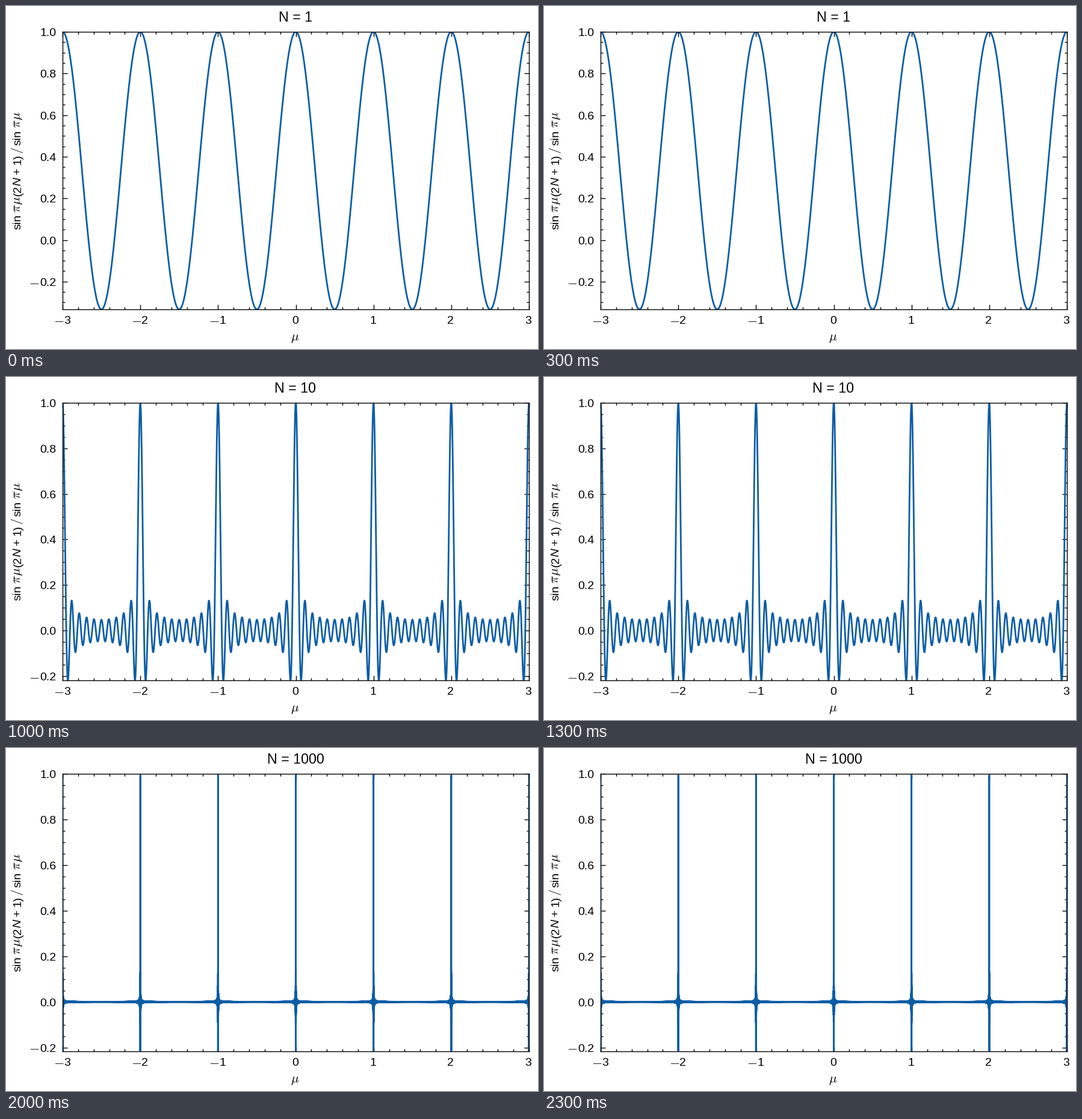
A matplotlib script that plays this animation: 884 px wide and 571 px high, repeating every 2500 ms.

```python
import numpy as np
import matplotlib.pyplot as plt
from matplotlib.animation import FuncAnimation
from matplotlib.ticker import MultipleLocator

W, H, DPI = 884, 571, 200
LEFT, RIGHT, TOP, BOTTOM = 94, 869, 43, 505  # axes edges in pixels from the top left
ORDERS = [1, 5, 10, 100, 1000]
Y_TICKS = np.arange(-1, 6) / 5

plt.rcParams.update({
    "font.family": "Liberation Sans",
    "font.size": 7,
    "axes.linewidth": 0.5,
    "path.simplify": False,
})

fig = plt.figure(figsize=(W / DPI, H / DPI), dpi=DPI, facecolor="white")
ax = fig.add_axes([LEFT / W, 1 - BOTTOM / H, (RIGHT - LEFT) / W, (BOTTOM - TOP) / H])


def put(x, y, text, **style):
    """Place text by its baseline, in pixels from the top left."""
    return fig.text(x / W, 1 - y / H, text, va="baseline", **style)


def put_math(x, y, text, size, **style):
    return put(x, y, text, size=size, math_fontfamily="cm", **style)


def kernel(x, n):
    """Normalised Dirichlet kernel; its limit at whole x is 1."""
    m = 2 * n + 1
    low = np.sin(np.pi * x)
    peak = np.abs(low) < 1e-9
    return np.where(peak, 1, np.sin(m * np.pi * x) / (m * np.where(peak, 1, low)))


mu = np.linspace(-3, 3, 100_000)
curves = [kernel(mu, n) for n in ORDERS]
line, = ax.plot(mu, curves[0], color="#0C5DA5", lw=1)

ax.set_xlim(-3, 3)
ax.xaxis.set_major_locator(MultipleLocator(1))
ax.xaxis.set_minor_locator(MultipleLocator(0.2))
ax.yaxis.set_major_locator(MultipleLocator(0.2))
ax.yaxis.set_minor_locator(MultipleLocator(0.05))
ax.tick_params(which="both", direction="in", width=0.5, top=True, right=True,
               labelbottom=False, labelleft=False)
ax.tick_params(which="major", length=3)
ax.tick_params(which="minor", length=1.5)

title = put(481, 26.4, "", size=8.4, ha="center")

# Horizontal axis labels
for k in range(-3, 4):
    x = LEFT - 1 + (k + 3) * (RIGHT - LEFT) / 6
    if k < 0:
        put_math(x - 14.1, 529, "$-$", 8)
        put(x + 3.2, 529, str(-k))
    else:
        put(x, 529, str(k), ha="center")
put_math(480.2, 556.8, r"$\mu$", 7.7, ha="center")

# Vertical axis label, read upwards
LABEL_X = 24.4
upward = dict(rotation=90, rotation_mode="anchor", ha="left")
for y, text, slant in [(372.5, "sin", "normal"), (316.5, "(2", "normal"),
                       (299.2, "N", "italic"), (280.1, "+", "normal"),
                       (263.7, "1)", "normal"), (231.5, "sin", "normal")]:
    put(LABEL_X, y, text, style=slant, **upward)
put_math(LABEL_X, 246.4, "$/$", 7.5, **upward)
for y in (343.9, 202.9):
    put_math(LABEL_X, y, r"$\pi$", 7.7, **upward)
    put_math(LABEL_X, y - 13.1, r"$\mu$", 7.7, **upward)

y_labels = [put(83.2, 0, f"{abs(v):.1f}", ha="right") for v in Y_TICKS]
y_minus = put_math(55.2, 0, "$-$", 8, ha="right")


def update(i):
    y = curves[i]
    low = y.min()
    line.set_ydata(y)
    ax.set_ylim(low, 1)
    title.set_text(f"N = {ORDERS[i]}")
    for value, label in zip(Y_TICKS, y_labels):
        row = TOP + (1 - value) / (1 - low) * (BOTTOM - TOP)
        label.set_y(1 - (row + 7) / H)
    y_minus.set_y(y_labels[0].get_position()[1])
    return [line, title, y_minus, *y_labels]


anim = FuncAnimation(fig, update, frames=len(ORDERS), interval=500,
                     repeat=True, repeat_delay=0, blit=False)
plt.show()
```
